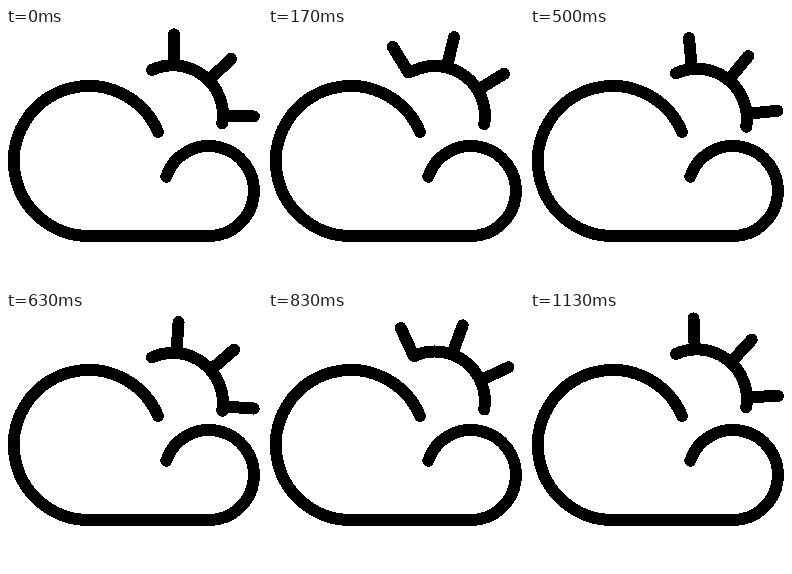
Recreate the animation shown at these times as an HTML page. Size 256 by 256 pixels, loop 1180 ms.

```html
<!DOCTYPE html>
<html lang="en">
<head>
<meta charset="utf-8">
<title>Partly cloudy</title>
<style>
  html, body { margin: 0; width: 100%; height: 100%; overflow: hidden; background: #fff; }
  svg { display: block; width: 100vw; height: 100vh; }
  path { fill: none; stroke: #000; stroke-width: 12; stroke-linecap: round; shape-rendering: crispEdges; }
</style>
</head>
<body>
<svg viewBox="0 0 256 256">
  <path d="M152 104A75 75 0 1 0 83 208H203A45 45 0 1 0 160.3 148.7"/>
  <g id="sun">
    <path d="M-20.9 -45.4A50 50 0 0 1 49.4 8"/>
    <path id="rays"/>
  </g>
</svg>
<script>
  const LOOP = 1180, STEPS = 28, STEP_MS = 125 / 3;
  const RAY_IN = 51, RAY_OUT = 81, GAP = 45, TILT = 0.8;
  const SWAP = 4; // step at which the last ray sets and a new one rises
  const sun = document.getElementById("sun");
  const rays = document.getElementById("rays");

  const startOf = i => Math.round(i * STEP_MS / 10) * 10;

  function stepAt(t) {
    let i = STEPS - 1;
    while (i > 0 && startOf(i) > t) i--;
    return i;
  }

  function point(deg, r) {
    const a = deg * Math.PI / 180;
    return (r * Math.sin(a)).toFixed(2) + " " + (-r * Math.cos(a)).toFixed(2);
  }

  function draw(t) {
    const i = stepAt(t);
    const half = i % (STEPS / 2);
    const turn = TILT + half * GAP / (STEPS / 2) - (half >= SWAP ? GAP : 0);
    const y = 89.1 - 1.8 * Math.cos(2 * Math.PI * i / STEPS);
    sun.setAttribute("transform", `translate(166.9 ${y.toFixed(2)})`);
    rays.setAttribute("d", [0, 1, 2].map(k => {
      const deg = turn + k * GAP;
      return `M${point(deg, RAY_IN)}L${point(deg, RAY_OUT)}`;
    }).join(""));
  }

  const begin = performance.now();
  function tick() {
    draw((performance.now() - begin) % LOOP);
    requestAnimationFrame(tick);
  }
  tick();
</script>
</body>
</html>
```
